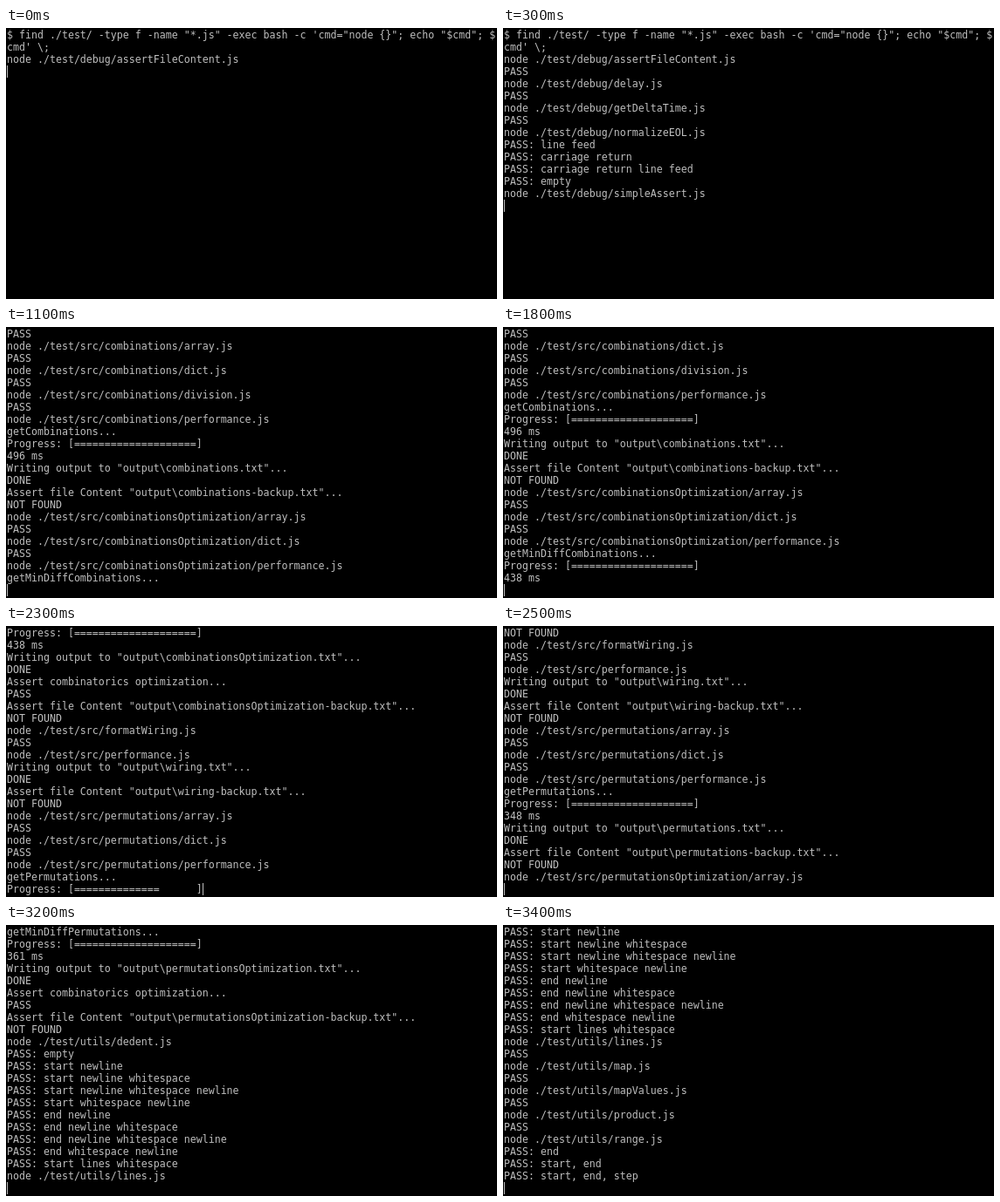
Animation of 562 by 311 pixels, one loop 3.5 s. Source, as an HTML page:

```html
<!DOCTYPE html>
<html lang="en">
<meta charset="utf-8">
<title>Test run</title>
<style>
  html, body { margin: 0; width: 100%; height: 100%; overflow: hidden; background: #000; }
  #screen {
    position: absolute; left: 1px; top: 1px; margin: 0; color: #bfbfbf;
    font: 11.627px/14px "DejaVu Sans Mono", monospace; font-variant-ligatures: none;
  }
  #cursor { position: absolute; width: 1px; height: 14px; background: #bfbfbf; }
</style>
<pre id="screen"></pre>
<div id="cursor"></div>
<script>
const ROWS = 22, COL = 7, LINE = 14, TICK = 100;

// "> name" runs a test file, "% n" sets the progress bar, "--" ends a tick.
const session = String.raw`$ find ./test/ -type f -name "*.js" -exec bash -c 'cmd="node {}"; echo "$cmd"; $
cmd' \;
> debug/assertFileContent
--
PASS
> debug/delay
--
PASS
> debug/getDeltaTime
--
PASS
> debug/normalizeEOL
PASS: line feed
PASS: carriage return
PASS: carriage return line feed
PASS: empty
> debug/simpleAssert
--
PASS
> debug/writeOutput
PASS
> src/combinations/array
PASS
> src/combinations/dict
--
PASS
> src/combinations/division
PASS
> src/combinations/performance
getCombinations...
% 3
--
% 7
--
% 11
--
% 15
--
% 19
--
% 20
496 ms
Writing output to "output\combinations.txt"...
DONE
Assert file Content "output\combinations-backup.txt"...
NOT FOUND
> src/combinationsOptimization/array
--
PASS
> src/combinationsOptimization/dict
PASS
> src/combinationsOptimization/performance
getMinDiffCombinations...
--
% 0
--
% 4
--
% 8
--
% 12
--
% 16
--
% 20
--
438 ms
--
Writing output to "output\combinationsOptimization.txt"...
DONE
Assert combinatorics optimization...
PASS
Assert file Content "output\combinationsOptimization-backup.txt"...
NOT FOUND
> src/formatWiring
--
PASS
> src/performance
Writing output to "output\wiring.txt"...
DONE
Assert file Content "output\wiring-backup.txt"...
NOT FOUND
> src/permutations/array
--
PASS
> src/permutations/dict
PASS
> src/permutations/performance
getPermutations...
% 3
--
% 9
--
% 14
--
% 19
--
% 20
348 ms
Writing output to "output\permutations.txt"...
DONE
Assert file Content "output\permutations-backup.txt"...
NOT FOUND
> src/permutationsOptimization/array
--
PASS
> src/permutationsOptimization/dict
PASS
> src/permutationsOptimization/performance
getMinDiffPermutations...
% 1
--
% 6
--
% 11
--
% 16
--
% 20
--
361 ms
Writing output to "output\permutationsOptimization.txt"...
DONE
Assert combinatorics optimization...
PASS
Assert file Content "output\permutationsOptimization-backup.txt"...
NOT FOUND
> utils/dedent
--
PASS: empty
PASS: start newline
PASS: start newline whitespace
PASS: start newline whitespace newline
PASS: start whitespace newline
PASS: end newline
PASS: end newline whitespace
PASS: end newline whitespace newline
PASS: end whitespace newline
PASS: start lines whitespace
> utils/lines
--
PASS
> utils/map
PASS
> utils/mapValues
--
PASS
> utils/product
PASS
> utils/range
PASS: end
PASS: start, end
PASS: start, end, step`;

const isBar = line => line.startsWith("Progress");
const log = [];

function print(line) {
  const arg = line.slice(2);
  if (line.startsWith("> ")) line = `node ./test/${arg}.js`;
  if (line.startsWith("% ")) {
    if (isBar(log.at(-1))) log.pop();
    line = `Progress: [${"=".repeat(arg).padEnd(20)}]`;
  }
  log.push(line);
}

const views = session.split("\n--\n").map(tick => {
  tick.split("\n").forEach(print);
  return (isBar(log.at(-1)) ? log : [...log, ""]).slice(-ROWS);
});

const screenEl = document.getElementById("screen");
const cursorEl = document.getElementById("cursor");
let shown;

function draw() {
  const view = views[Math.floor(performance.now() / TICK) % views.length];
  if (view !== shown) {
    shown = view;
    screenEl.textContent = view.join("\n");
    cursorEl.style.left = 1 + COL * view.at(-1).length + "px";
    cursorEl.style.top = 1 + LINE * (view.length - 1) + "px";
  }
  requestAnimationFrame(draw);
}
draw();
</script>
</html>
```
